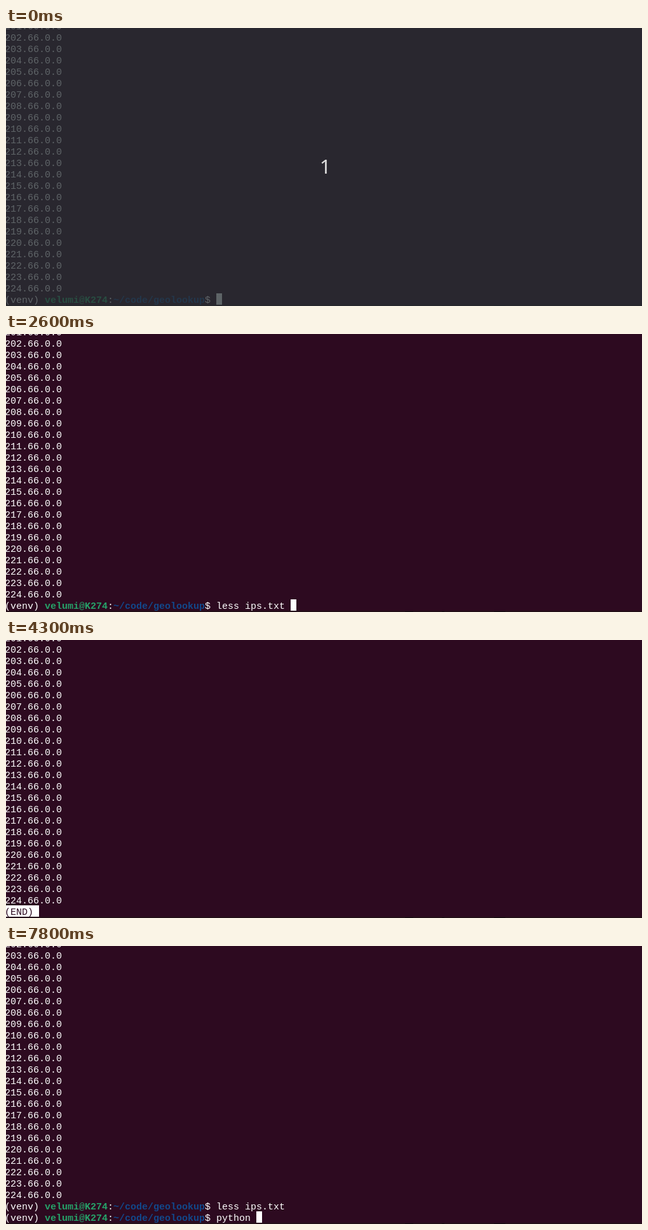
These frames come from a looping animation (1001x439 px, 8 s). An HTML page with a canvas:

```html
<!DOCTYPE html>
<html lang="en">
<head>
<meta charset="utf-8">
<title>Terminal session</title>
<style>
  html, body { margin: 0; width: 100%; height: 100%; overflow: hidden; background: #2d0a20; }
  canvas { display: block; }
</style>
</head>
<body>
<canvas id="stage" width="1001" height="439"></canvas>
<script>
const ctx = document.getElementById('stage').getContext('2d');
const LOOP = 8000;
const CELL = 9, LINE = 18, LEFT = -2, BOTTOM = 419, BASELINE = 15, ROWS = 25;
const BG = '#2d0a20', FG = '#ffffff', GREEN = '#26a269', BLUE = '#12488b';
const FONT = '15px "Liberation Mono", monospace';
const PROMPT = [
  ['(venv) ', FG],
  ['velumi@K274', GREEN, true],
  [':', FG],
  ['~/code/geolookup', BLUE, true],
  ['$ ', FG]
];
const PROMPT_LENGTH = PROMPT.reduce((n, [text]) => n + text.length, 0);

// Each entry: time, length of the command typed so far.
const LESS_KEYS = [[900, 1], [1100, 2], [1300, 3], [1400, 4], [1600, 5],
  [1800, 6], [1900, 7], [2200, 8], [2600, 13]];
const PYTHON_KEYS = [[6700, 1], [7100, 2], [7200, 3], [7300, 4], [7500, 5],
  [7700, 6], [7800, 7]];

// Pager pages: start time, last address shown, status text, inverse status.
const PAGES = [
  [3000, 69, 'ips.txt', true],
  [3900, 138, ':', false],
  [4100, 207, ':', false],
  [4300, 224, '(END)', true]
];

const cellX = col => LEFT + col * CELL;
const rowY = up => BOTTOM - up * LINE;
const within = (t, from, to) => t >= from && t < to;

function typed(command, keys, t) {
  const last = keys.filter(([at]) => at <= t).pop();
  return command.slice(0, last ? last[1] : 0);
}

function block(col, up, count = 1) {
  ctx.fillStyle = FG;
  ctx.fillRect(cellX(col), rowY(up), count * CELL, LINE);
}

function write(text, col, up, color = FG, bold = false) {
  ctx.font = (bold ? 'bold ' : '') + FONT;
  ctx.fillStyle = color;
  [...text].forEach((ch, i) => ctx.fillText(ch, cellX(col + i), rowY(up) + BASELINE));
}

function addresses(last, up) {
  for (let n = last; up < ROWS; n--, up++) write(n + '.66.0.0', 0, up);
}

function promptLine(command, up) {
  let col = 0;
  for (const [text, color, bold] of PROMPT) {
    write(text, col, up, color, bold);
    col += text.length;
  }
  write(command, col, up);
}

function shell(command, cursor) {
  promptLine(command, 0);
  if (cursor) block(PROMPT_LENGTH + command.length, 0);
}

function pager(t) {
  const [, last, status, inverse] = PAGES.filter(([at]) => at <= t).pop();
  addresses(last, 1);
  if (inverse) block(0, 0, status.length);
  write(status, 0, 0, inverse ? BG : FG);
  if (!within(t, 3600, 3900)) block(status.length, 0);
}

function countdown() {
  ctx.fillStyle = 'rgba(40, 48, 52, 0.75)';
  ctx.fillRect(0, 0, 1001, 439);
  ctx.font = '31px "Noto Sans", sans-serif';
  ctx.fillStyle = '#dedede';
  ctx.textAlign = 'center';
  ctx.fillText('1', 502.5, 230);
  ctx.textAlign = 'left';
}

function windowEdge() {
  ctx.fillStyle = '#241019';
  ctx.fillRect(0, 437, 1001, 2);
  ctx.fillStyle = '#12080e';
  for (const [x, w] of [[628, 13], [686, 4], [768, 18]]) ctx.fillRect(x, 438, w, 1);
}

function draw(t) {
  ctx.fillStyle = BG;
  ctx.fillRect(0, 0, 1001, 439);
  windowEdge();
  if (t < 3000) {
    addresses(224, 1);
    shell(typed('less ips.txt ', LESS_KEYS, t), !within(t, 100, 800));
  } else if (t < 5200) {
    pager(t);
  } else {
    addresses(224, 2);
    promptLine('less ips.txt', 1);
    shell(typed('python ', PYTHON_KEYS, t), !within(t, 5800, 6400));
  }
  if (t < 100) countdown();
}

const start = performance.now();
function tick() {
  draw((performance.now() - start) % LOOP);
  requestAnimationFrame(tick);
}
tick();
</script>
</body>
</html>
```
